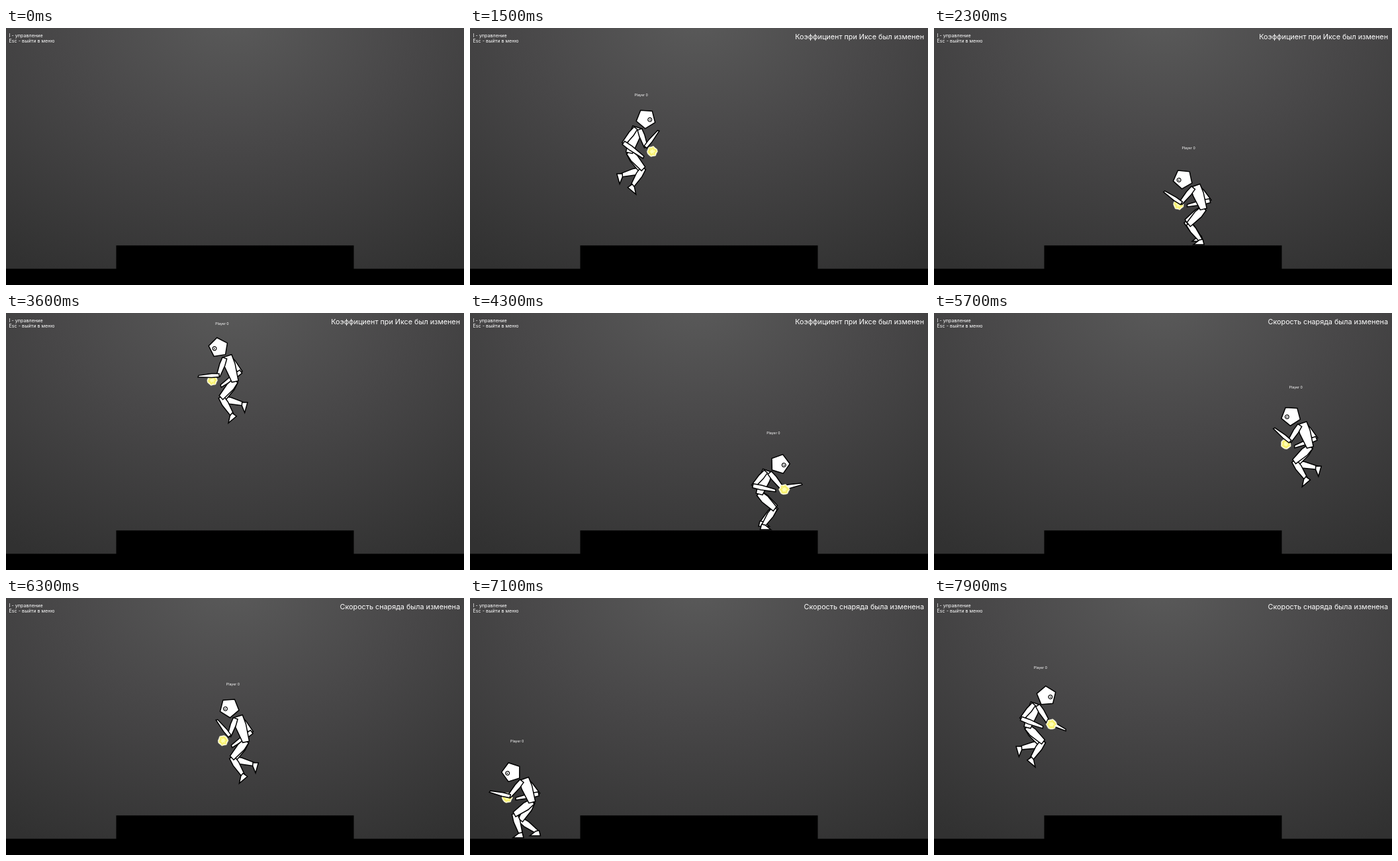
Animation, 692 px wide and 388 px high, one loop 8000 ms. Source, as an HTML page with a canvas:

```html
<!DOCTYPE html>
<html lang="ru">
<head>
<meta charset="utf-8">
<style>
  html, body { margin: 0; width: 100%; height: 100%; overflow: hidden; background: #000; }
  canvas {
    display: block;
    background: radial-gradient(620px 440px at 346px -20px, #5a5a5a, #484748 45%, #313131);
  }
</style>
</head>
<body>
<canvas id="stage" width="692" height="388"></canvas>
<script>
const ctx = document.getElementById('stage').getContext('2d');
const LOOP = 8000, STEP = 100;
const GROUND = 216, PLATFORM = 181;   // label height while standing there
const HALF_GRAVITY = 975;             // px per second squared

// [ms, label x] where the player turns, stops or starts
const path = [[500, -90], [2080, 461], [2460, 329], [3850, 326], [5190, 720], [7130, 61], [7900, 161]];
// [ms, forearm angle]
const aims = [[1500, -.9], [2300, -.6], [3600, .05], [6300, -.9], [7900, .45]];
// [apex in seconds, label y there]; the ones at platform height are walks off its edge
const arcs = [[1.236, 33], [3.515, 9], [4.577, PLATFORM], [5.985, 33], [6.868, PLATFORM], [8.172, 33]];

function between(keys, t) {
  const next = keys.findIndex(k => k[0] > t);
  if (next === 0) return keys[0][1];
  if (next < 0) return keys[keys.length - 1][1];
  const [t0, v0] = keys[next - 1], [t1, v1] = keys[next];
  return v0 + (v1 - v0) * (t - t0) / (t1 - t0);
}
const xAt = t => between(path, t);
const surfaceAt = x => x > 150 && x < 540 ? PLATFORM : GROUND;
const yAt = t => Math.min(surfaceAt(xAt(t)),
  ...arcs.map(([apex, top]) => top + HALF_GRAVITY * (t / 1000 - apex) ** 2));

function shape(points) {
  ctx.beginPath();
  points.forEach(([x, y]) => ctx.lineTo(x, y));
  ctx.closePath();
  ctx.fill();
  ctx.stroke();
}
function placed([x, y], angle, draw) {
  ctx.save();
  ctx.translate(x, y);
  ctx.rotate(angle);
  draw();
  ctx.restore();
}
// Tapered part from a to b; w0, w1, w2 are half widths along it
function bone(a, b, w0, w1, w2) {
  const dx = b[0] - a[0], dy = b[1] - a[1], len = Math.hypot(dx, dy);
  placed(a, Math.atan2(dy, dx), () => shape([
    [-1, -w0], [len * .35, -w1], [len, -w2], [len + 1, w2], [len * .35, w1], [-1, w0]
  ]));
}
// The knee follows from thigh and shin being 32 long
function leg(hip, ankle, footAngle) {
  const dx = ankle[0] - hip[0], dy = ankle[1] - hip[1], d = Math.hypot(dx, dy);
  const bend = Math.sqrt(Math.max(0, 32 * 32 - d * d / 4)) / d;
  const knee = [hip[0] + dx / 2 + dy * bend, hip[1] + dy / 2 - dx * bend];
  bone(knee, ankle, 4, 5, 2.5);
  bone(hip, knee, 4.5, 6.2, 4);
  placed(ankle, footAngle, () => shape([[-4, 5], [-2, -3], [3, -2], [12, 5]]));
}
function legs(hip, x, airborne, running) {
  for (const side of [-1, 1]) {
    const swing = side * Math.cos(x / 12 + 1), lift = Math.max(0, -side * Math.sin(x / 12 + 1));
    if (airborne) leg(hip, [-22.5 + 8.5 * side, 130 + 8.5 * side], 1 - .3 * side);
    else if (running) leg(hip, [-17 + 16 * swing, 141 - 5 * lift], 0);
    else leg(hip, [-18 + 3 * side, 141], 0);
  }
}
function ring(count, radiusAt, turn = 0) {
  return Array.from({ length: count }, (_, i) => {
    const a = turn + i * 2 * Math.PI / count, r = radiusAt(i);
    return [r * Math.cos(a), r * Math.sin(a)];
  });
}
function head(center, angle) {
  placed(center, 0, () => {
    shape(ring(5, () => 15, angle + .38));
    ctx.lineWidth = 1.2;
    shape(ring(9, () => 3, 0).map(([x, y]) => [x + 6, y + 1.5]));
    ctx.fillStyle = '#000';
    ctx.fillRect(5.5, 1, 1.5, 1.5);
  });
}
function fireball(t) {
  placed([16.5, 85.5], 0, () => {
    const layers = [[7.7, .6, '#fffde0'], [6, 1.2, '#f8f06c'], [3, 1.2, '#ffffb4']];
    for (const [radius, wobble, color] of layers) {
      ctx.fillStyle = ctx.strokeStyle = color;
      ctx.lineWidth = .5;
      shape(ring(14, i => radius + wobble * Math.sin(i * 78.2 + t * .37)));
    }
  });
}

function player(t) {
  const x = xAt(t), y = yAt(t), dx = xAt(t + 20) - xAt(t), right = dx >= 0;
  const airborne = y < surfaceAt(x) - 2;
  const rise = (y - yAt(t + 20)) / 20;
  const lean = airborne ? Math.min(1, Math.max(0, rise * 1.2)) : 1;
  const aim = between(aims, t);

  const neck = [-6 - 3 * lean, 50 + 8 * lean];
  const hip = [-18 - 3 * lean, 87 + 5 * lean];
  const elbow = [7 + 6 * lean, 78 + 5 * lean];
  const hand = [elbow[0] + 30 * Math.cos(aim), elbow[1] + 30 * Math.sin(aim)];
  const rearElbow = [-26 - 4 * lean, 73 + 7 * lean];
  const rearArm = () => {
    bone([neck[0] - 3, neck[1] + 1], rearElbow, 3.2, 4.2, 3);
    bone(rearElbow, [3, 94 - 7 * lean], 3, 3.6, 1.8);
  };

  ctx.save();
  ctx.translate(right ? x : x + 1.5, y);
  ctx.scale(right ? 1 : -1, 1);
  ctx.fillStyle = '#fff';
  ctx.strokeStyle = '#000';
  ctx.lineWidth = 1.5;
  if (!right) { rearArm(); fireball(t); }
  legs(hip, x, airborne, Math.abs(dx) > 2);
  bone(neck, hip, 7.5, 8.2, 5);
  bone([neck[0] + 4, neck[1] + 3], elbow, 3.5, 4.2, 2.8);
  bone(elbow, hand, 2.6, 3, 1.2);
  head([7 + 3 * lean, 36 + 11 * lean], -.57 * (aim + .9));
  if (right) { rearArm(); fireball(t); }
  ctx.restore();
  text('Player 0', x, y + 2, 5.3, 'center');
}
function text(string, x, y, size, align) {
  ctx.font = size + 'px Inter, sans-serif';
  ctx.textAlign = align;
  ctx.fillStyle = '#fff';
  ctx.fillText(string, x, y);
}

function frame() {
  const t = Math.floor(performance.now() % LOOP / STEP) * STEP;
  ctx.clearRect(0, 0, 692, 388);
  ctx.fillStyle = '#000';
  ctx.fillRect(166.5, 328.3, 359, 40);
  ctx.fillRect(0, 363.5, 692, 25);
  if (t >= 500) {
    player(t);
    text(t < 5300 ? 'Коэффициент при Иксе был изменен' : 'Скорость снаряда была изменена',
      686, 17, 10.8, 'right');
  }
  text('I - управление', 4.5, 13.5, 7.2, 'left');
  text('Esc - выйти в меню', 4.5, 22.2, 7.2, 'left');
  requestAnimationFrame(frame);
}
frame();
</script>
</body>
</html>
```
